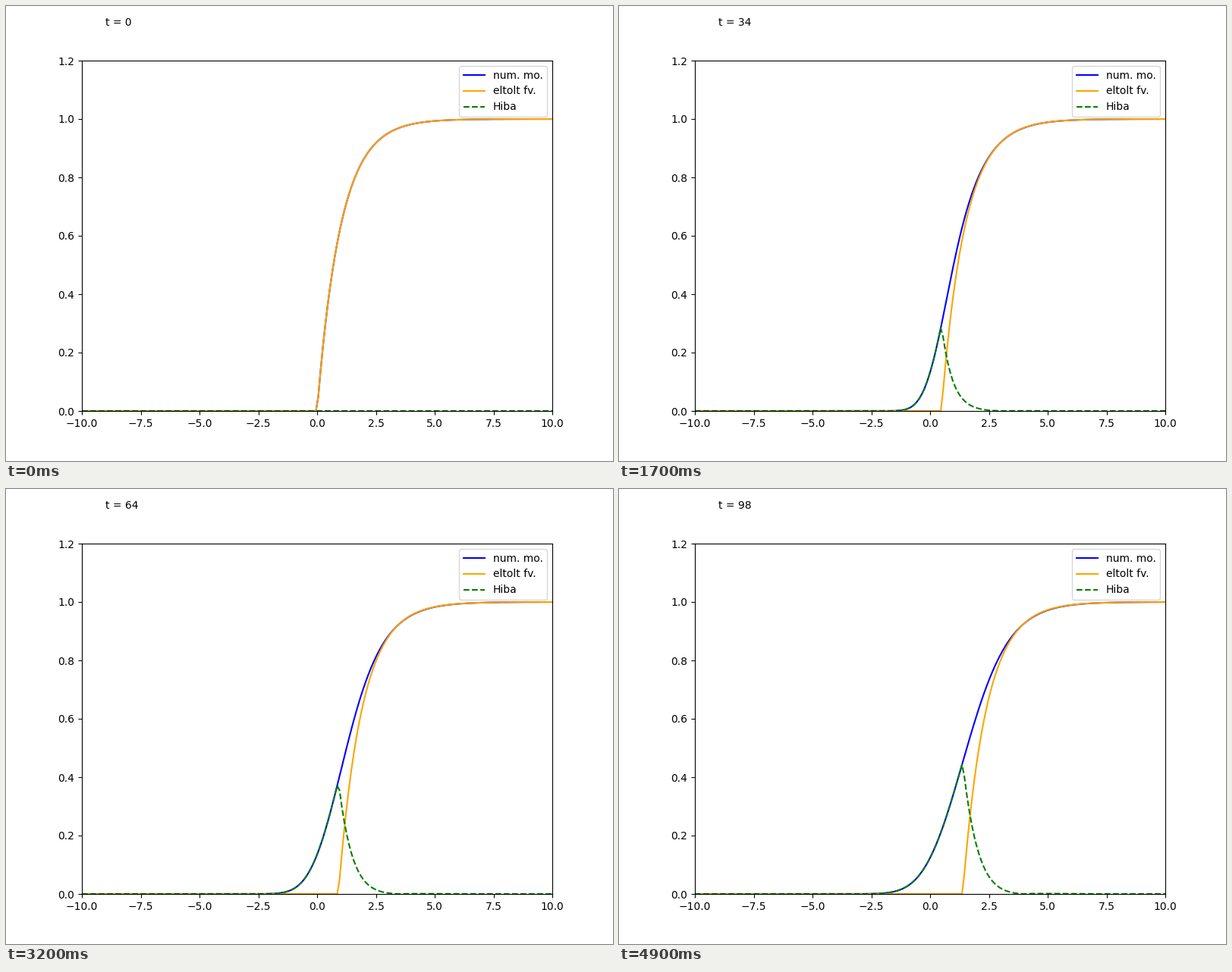
Recreate the animation shown at these times as a matplotlib script. Size 800 by 600 pixels, loop 5 s.

```python
import numpy as np
import matplotlib.pyplot as plt
from matplotlib.animation import FuncAnimation

FRAMES, STRIDE, INTERVAL = 50, 2, 100
DT, DIFFUSION, RATE = 0.01, 0.5, 1.0
SPEED = 2 * np.sqrt(DIFFUSION * RATE)

x = np.linspace(-10, 10, 200)
dx = x[1] - x[0]


def profile(s):
    return np.where(s > 0, 1 - np.exp(-np.maximum(s, 0)), 0.0)


def step(u):
    """One explicit Euler step of u_t = D u_xx - r u (1 - u), ends held fixed."""
    new = u.copy()
    mid = u[1:-1]
    curvature = (u[2:] - 2 * mid + u[:-2]) / dx**2
    new[1:-1] = mid + DT * (DIFFUSION * curvature - RATE * mid * (1 - mid))
    return new


solution = [profile(x)]
for _ in range(FRAMES * STRIDE):
    solution.append(step(solution[-1]))

fig, ax = plt.subplots(figsize=(8, 6), dpi=100)
ax.set_xlim(-10, 10)
ax.set_ylim(0, 1.2)
numeric, = ax.plot(x, solution[0], color="blue", label="num. mo.")
shifted, = ax.plot(x, solution[0], color="orange", label="eltolt fv.")
error, = ax.plot(x, 0 * x, color="green", linestyle="--", label="Hiba")
ax.legend(loc="upper right")
clock = ax.text(0.05, 1.1, "t = 0", transform=ax.transAxes)


def update(frame):
    n = frame * STRIDE
    u = solution[n]
    wave = profile(x - SPEED * n * DT)
    numeric.set_ydata(u)
    shifted.set_ydata(wave)
    error.set_ydata(np.abs(u - wave))
    clock.set_text(f"t = {n}")
    return numeric, shifted, error, clock


anim = FuncAnimation(fig, update, frames=FRAMES, interval=INTERVAL,
                     repeat=True, repeat_delay=0)
plt.show()
```
